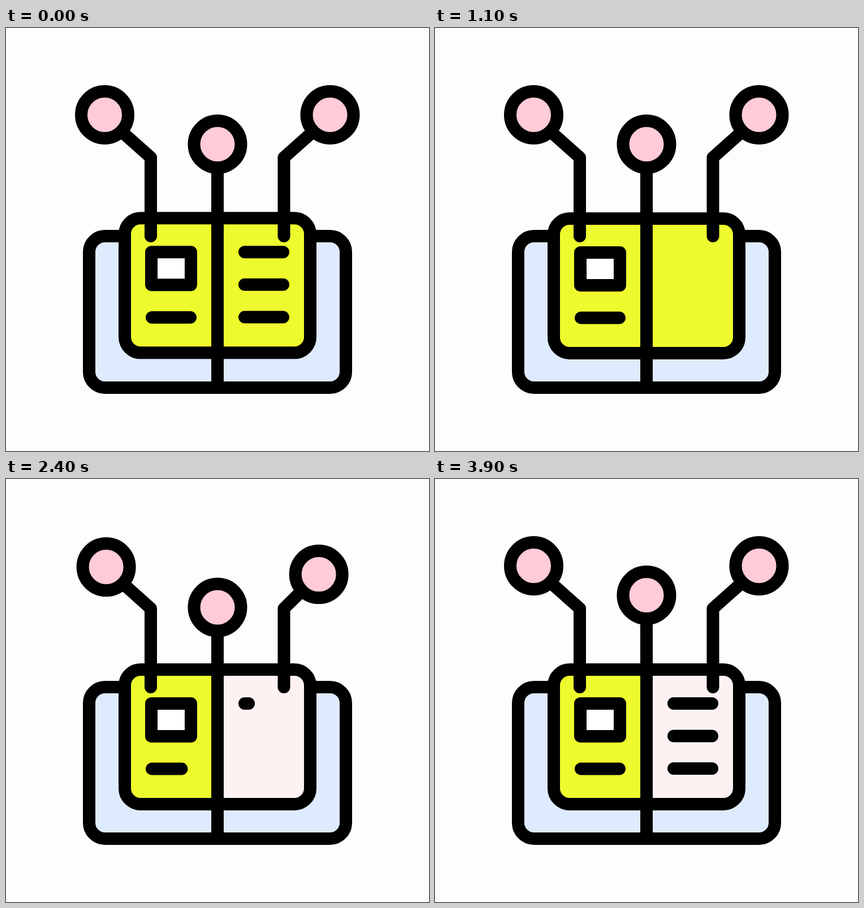
Write an HTML page that moves like this. It is 748 px wide and 748 px high and loops after 4 s.

```html
<!DOCTYPE html>
<html lang="en">
<head>
<meta charset="utf-8">
<title>Connected book</title>
<style>
  html, body { margin: 0; width: 100%; height: 100%; overflow: hidden; background: #fdfdfd; }
  svg { display: block; width: 100%; height: 100%; }
  .ink { fill: none; stroke: #000; stroke-width: 22; stroke-linecap: round; stroke-linejoin: round; }
  .blue { fill: #deebff; }
  .yellow { fill: #edfb2e; }
  .blush { fill: #fdf1f1; }
  .pink { fill: #ffcbd6; }
  .white { fill: #fff; }
</style>
</head>
<body>
<svg viewBox="0 0 748 748">
  <defs>
    <path id="half" d="M374 337H510a28 28 0 0 1 28 28V547a28 28 0 0 1-28 28H374Z"/>
  </defs>
  <rect class="ink blue" x="147" y="368" width="454" height="268" rx="28"/>
  <path class="ink" d="M374 368V636"/>
  <g id="book">
    <rect class="yellow" x="210" y="337" width="328" height="238" rx="28"/>
    <use id="newPage" class="blush" href="#half"/>
    <rect class="ink" x="210" y="337" width="328" height="238" rx="28"/>
    <path class="ink" d="M374 337V575"/>
    <rect id="picture" class="ink white" x="257" y="397" width="70" height="58"/>
    <g id="lines"></g>
    <use id="flip" class="ink yellow" href="#half"/>
  </g>
  <g id="antennas"></g>
</svg>
<script>
const LOOP = 4000, STEP = 100;
const FLIP_START = 1100, FLIP_END = 1960;
const BOB = 930;

// Book jump, one pose per step: [shift x, rise, degrees]
const jump = [
  [0, .7, 0], [6, 10, 24], [2, 56, 5], [-14, 87, -25], [-7, 60, -14],
  [-.5, 36, -3], [-6.5, 78, 7], [-3, 45, 3], [0, 12, -1], [0, 0, 0]
];

// Text lines: start point, when they are wiped and when they are written
const lines = [
  { x: 258, y: 512.5, wipe: FLIP_END - 300, write: 2193 },
  { x: 422, y: 397, wipe: 800, write: 2340 },
  { x: 422, y: 454.5, wipe: 700, write: 2650 },
  { x: 422, y: 512, wipe: 600, write: 2950 }
];

// Antennas: foot and elbow, node centre, inward travel, where the stem meets the node
const antennas = [
  { stem: "M256 368V229", x: 174.5, y: 153.5, dx: 27.5, dy: 21.5, jx: 36, jy: 35, start: 2307 },
  { stem: "M374 368V300", x: 374, y: 205.5, dx: 0, dy: 22.6, jx: 0, jy: 42, start: 1870 },
  { stem: "M491.5 368V229", x: 573, y: 153.5, dx: -27, dy: 20.5, jx: -36, jy: 35, start: 2095 }
];

const byId = id => document.getElementById(id);
const clamp = v => Math.min(1, Math.max(0, v));
const ease = (t, start, span) => {
  const u = clamp((t - start) / span);
  return u * u * (3 - 2 * u);
};

function add(parent, tag, className) {
  const el = document.createElementNS("http://www.w3.org/2000/svg", tag);
  el.setAttribute("class", className);
  return byId(parent).appendChild(el);
}

for (const line of lines) line.el = add("lines", "path", "ink");
for (const a of antennas) {
  a.path = add("antennas", "path", "ink");
  a.node = add("antennas", "circle", "ink pink");
  a.node.setAttribute("r", 41.5);
}

const show = (el, on) => el.setAttribute("visibility", on ? "visible" : "hidden");

function drawBook(t) {
  const [x, rise, angle] = jump[Math.min(t / STEP, jump.length - 1)];
  byId("book").setAttribute("transform", `translate(${x} ${-rise}) rotate(${angle} 374 456)`);

  const turn = 1 - 2 * ease(t, FLIP_START, FLIP_END - FLIP_START);
  byId("flip").setAttribute("transform", `translate(374 0) scale(${turn} 1) translate(-374 0)`);
  show(byId("flip"), t > FLIP_START && t < FLIP_END);
  show(byId("newPage"), t > FLIP_START);

  const size = t < FLIP_END ? 1 : ease(t, FLIP_END, 240);
  byId("picture").setAttribute("transform", `translate(292 426) scale(${size}) translate(-292 -426)`);

  for (const { el, x, y, wipe, write } of lines) {
    const amount = t < FLIP_END ? 1 - ease(t, wipe, 300) : ease(t, write, 300);
    show(el, amount > 0);
    el.setAttribute("d", `M${x} ${y}h${68 * amount}`);
  }
}

function drawAntennas(t) {
  for (const a of antennas) {
    const bob = (1 - Math.cos(2 * Math.PI * clamp((t - a.start) / BOB))) / 2;
    const x = a.x + a.dx * bob, y = a.y + a.dy * bob;
    a.path.setAttribute("d", `${a.stem}L${x + a.jx} ${y + a.jy}`);
    a.node.setAttribute("cx", x);
    a.node.setAttribute("cy", y);
  }
}

function frame() {
  const t = Math.floor(performance.now() % LOOP / STEP) * STEP;
  drawBook(t);
  drawAntennas(t);
  requestAnimationFrame(frame);
}
frame();
</script>
</body>
</html>
```
